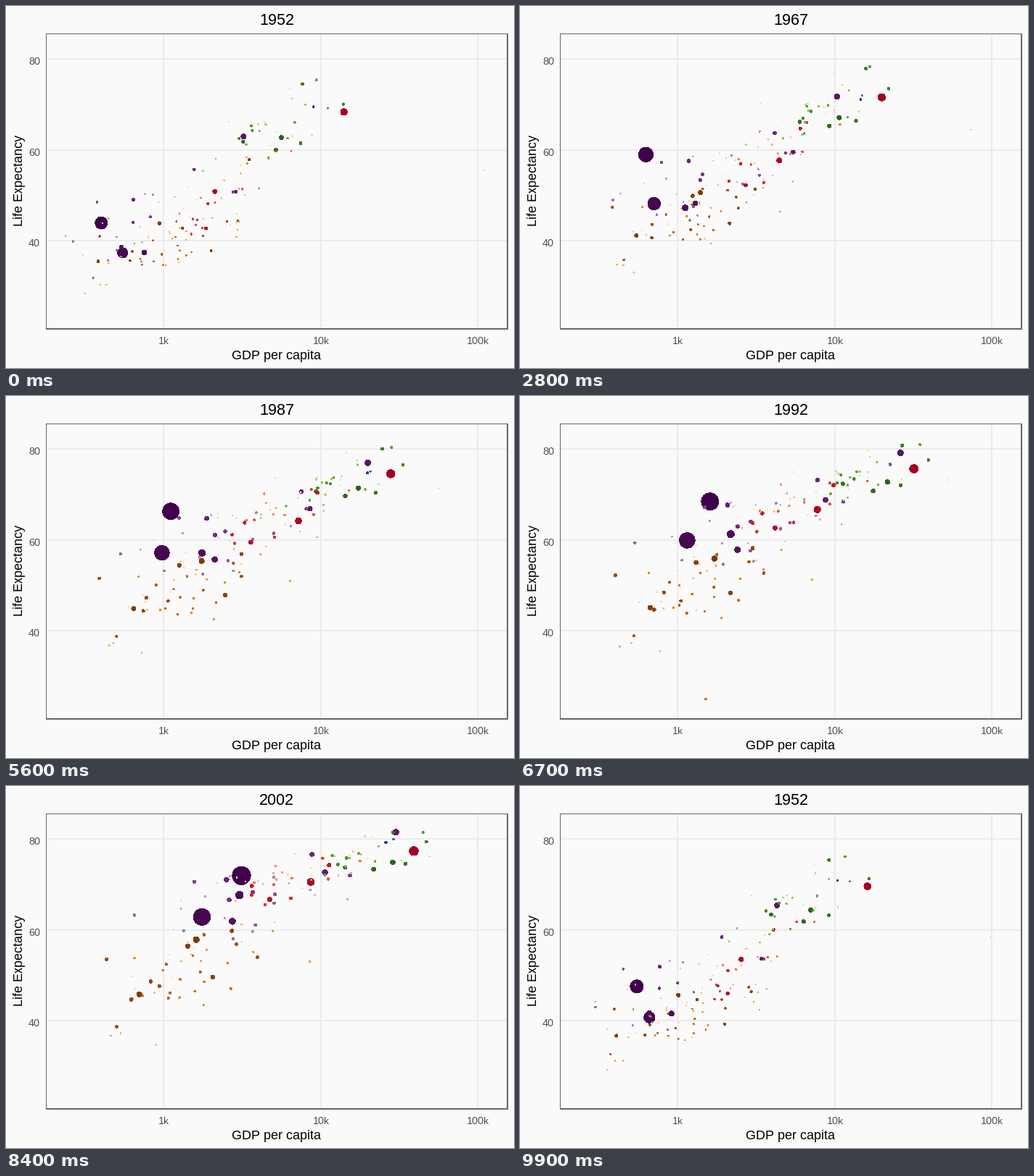
A matplotlib script for the animation above (10000 ms loop, 700 px wide and 500 px high).

```python
import numpy as np
import matplotlib.pyplot as plt
from matplotlib.animation import FuncAnimation
from matplotlib.colors import LinearSegmentedColormap
from matplotlib.patches import Rectangle

W, H, DPI = 700, 500, 100
STATES, FRAMES = 12, 100
T = np.arange(STATES)
FIRST_FRAME = np.cumsum([0, 8] + [9] * 4 + [8] * 7)   # frame at which each state is reached

RAMPS = {
    "Africa": ("#7F3B08", "#B35806", "#E08214", "#FDB863", "#FEE0B6"),
    "Americas": ("#A50026", "#D73027", "#F46D43", "#FDAE61", "#FEE090"),
    "Asia": ("#40004B", "#762A83", "#9970AB", "#C2A5CF", "#E7D4E8"),
    "Europe": ("#276419", "#4D9221", "#7FBC41", "#B8E186", "#E6F5D0"),
    "Oceania": ("#313695", "#4575B4"),
}

# count, largest population, growth, log GDP and life at start, middle and end,
# spread of log GDP, spread of life at start and end
REGIONS = {
    "Africa": (52, 33, 3.9, (2.97, 3.1, 3.13), (39.5, 49, 52), 0.25, (4, 6.5)),
    "Americas": (23, 28, 2.6, (3.42, 3.68, 3.82), (52, 64, 73), 0.2, (6.5, 3)),
    "Asia": (28, 45, 3.2, (3.05, 3.45, 3.65), (45, 59, 69), 0.36, (6.5, 5.5)),
    "Europe": (30, 60, 1.3, (3.7, 4.06, 4.32), (65.5, 72, 77.5), 0.23, (4.5, 2.5)),
    "Oceania": (2, 9, 2.2, (4.01, 4.23, 4.47), (69.2, 72.8, 80.7), 0.02, (0.3, 0.4)),
}

# the dots that stand out: population at start and end, then (state, GDP, life) keys
GIANTS = {
    "China": ("Asia", (556, 1319), (0, 400, 44), (1, 576, 50.5), (2, 488, 44.5), (3, 613, 58.4),
              (5, 741, 64), (8, 1656, 68.7), (10, 3119, 72), (11, 4959, 73)),
    "India": ("Asia", (372, 1110), (0, 547, 37.4), (5, 813, 54.2), (8, 1164, 60.2),
              (10, 1747, 62.9), (11, 2452, 64.7)),
    "Japan": ("Asia", (86, 127), (0, 3217, 63), (3, 9848, 71.4), (8, 26825, 79.4),
              (11, 31656, 82.6)),
    "Indonesia": ("Asia", (82, 224), (0, 750, 37.5), (5, 1383, 52.7), (11, 3541, 70.7)),
    "Kuwait": ("Asia", (0.2, 2.5), (0, 108382, 55.6), (5, 59265, 69.3), (11, 47307, 77.6)),
    "United States": ("Americas", (157, 301), (0, 13990, 68.4), (5, 24073, 73.4),
                      (11, 42952, 78.2)),
    "Brazil": ("Americas", (57, 190), (0, 2109, 50.9), (5, 6660, 61.5), (11, 9066, 72.4)),
}

rng = np.random.default_rng(11)


def noise(size=None):
    return np.clip(rng.normal(size=size), -1.9, 1.9)


def giant(pop, *keys):
    state, gdp, life = np.transpose(keys)
    return pop, np.interp(T, state, np.log10(gdp)), np.interp(T, state, life)


def country(rank, n, top, growth, gdp, life, spread, life_spread):
    knots = (0, 5, 11)
    wealth = noise()
    health = 0.65 * wealth + 0.75 * noise()
    drift = np.cumsum([0, *noise(2)]) * 0.4 * spread
    log_gdp = np.interp(T, knots, np.array(gdp) + spread * wealth + drift)
    years = np.interp(T, knots, life) + np.linspace(*life_spread, STATES) * health
    pop = top / (1 + 0.4 * rank) * (1 - (rank / n) ** 2)
    return ((pop, pop * growth), log_gdp + 0.02 * noise(STATES),
            np.minimum(years + 0.3 * noise(STATES), 81.5))


def build():
    rows = []
    for region, rule in REGIONS.items():
        group = [giant(*g[1:]) for g in GIANTS.values() if g[0] == region]
        group += [country(rank, *rule) for rank in range(rule[0])]
        if region == "Africa":
            group[20][2][8] -= 24   # one sudden fall in 1992
        group.sort(key=lambda row: -row[0][1])
        ramp = LinearSegmentedColormap.from_list(region, RAMPS[region])
        rows += [(*row, ramp(i / (len(group) - 1))) for i, row in enumerate(group)]
    return sorted(rows, key=lambda row: -row[0][0])


pops, gdps, lives, colors = zip(*build())
xs = 217.5 + 216.5 * (np.array(gdps) - 3)
ys = 73.5 + 6.28 * (80 - np.array(lives))
diam = np.array([0.3 + 0.705 * np.sqrt(np.linspace(*p, STATES)) for p in pops])
diam = np.maximum(diam, 1.3)

plt.rcParams.update({"font.family": "Liberation Sans", "text.hinting": "native",
                     "text.hinting_factor": 1})
fig = plt.figure(figsize=(W / DPI, H / DPI), dpi=DPI, facecolor="#FAFAFA")
ax = fig.add_axes([0, 0, 1, 1])
ax.set(xlim=(0, W), ylim=(H, 0))
ax.axis("off")


def bar(x, y, w, h, color, z):
    ax.add_patch(Rectangle((x, y), w, h, fc=color, lw=0, antialiased=False, zorder=z))


def label(x, y, text, px, color="black", ha="center", **kw):
    return ax.text(x, y, text, fontsize=px * 72 / DPI, color=color, ha=ha, va="baseline", **kw)


for x, text in ((216, "1k"), (433, "10k"), (649, "100k")):
    bar(x, 39, 2, 406, "#EBEBEB", 1)
    label(x + 1, 467, text, 14.4, "#4D4D4D")
for y, text in ((72, "80"), (198, "60"), (323, "40")):
    bar(56, y, 634, 2, "#EBEBEB", 1)
    label(47, y + 9, text, 14.4, "#4D4D4D", ha="right")

for box in ((55, 38, 637, 1), (55, 445, 637, 2), (55, 38, 1, 409), (690, 38, 2, 409)):
    bar(*box, "#666666", 4)

label(372.5, 488, "GDP per capita", 18)
label(23, 241.5, "Life Expectancy", 18, rotation=90, rotation_mode="anchor")
title = label(373, 26, "1952", 21.6)

dots = ax.scatter(xs[:, 0], ys[:, 0], c=colors, linewidths=0, antialiaseds=False, zorder=3)


def update(frame):
    s = np.searchsorted(FIRST_FRAME, frame, side="right") - 1
    p = (frame - FIRST_FRAME[s]) / (FIRST_FRAME[s + 1] - FIRST_FRAME[s])
    nxt = (s + 1) % STATES

    def mix(a):
        return a[:, s] * (1 - p) + a[:, nxt] * p

    dots.set_offsets(np.column_stack([mix(xs), mix(ys)]))
    dots.set_sizes((mix(diam) * 72 / DPI) ** 2)
    title.set_text(str(1952 + 5 * (nxt if p >= 0.5 else s)))
    return dots, title


anim = FuncAnimation(fig, update, frames=FRAMES, interval=100, repeat=True, repeat_delay=0)
plt.show()
```
